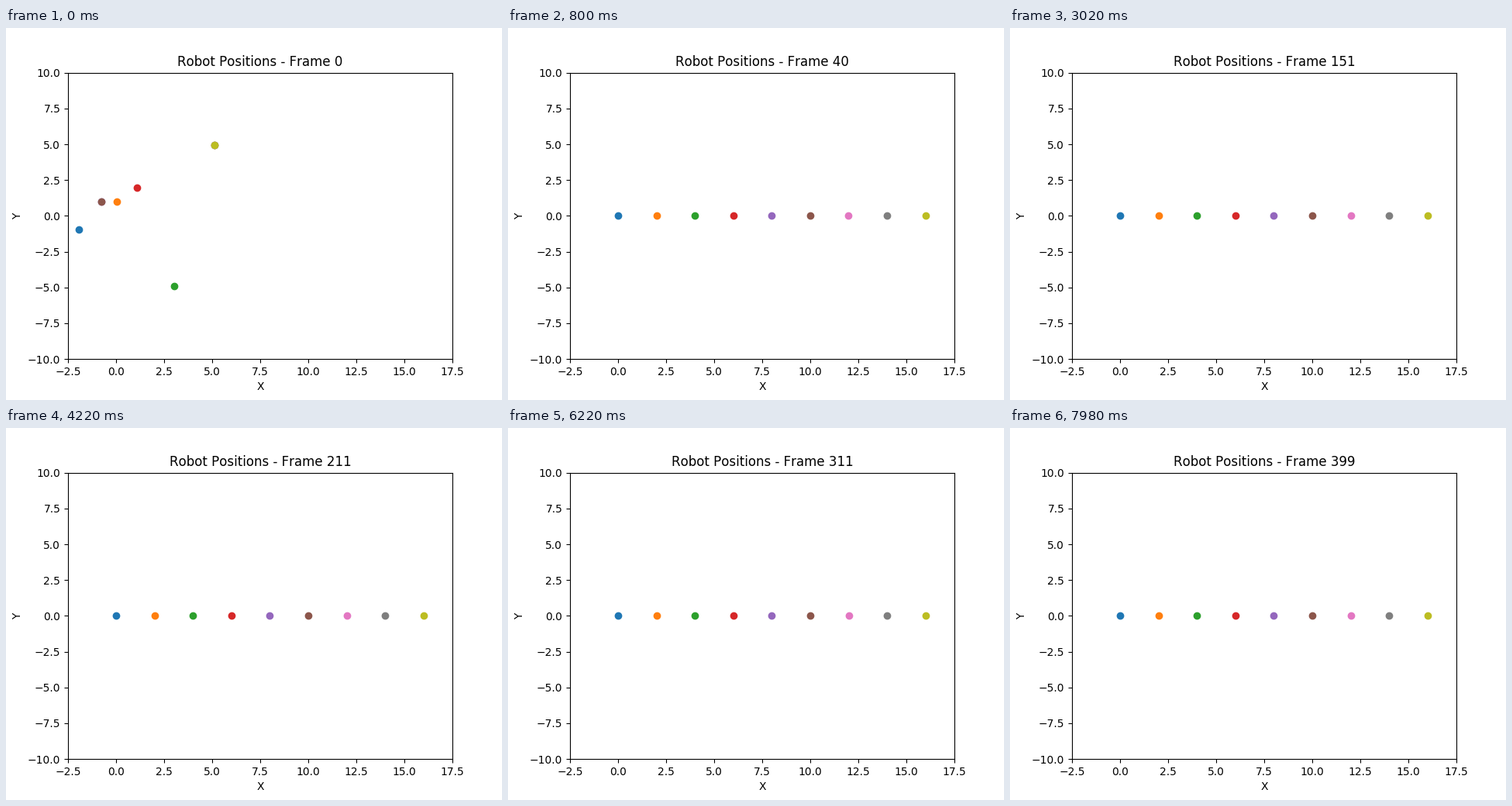
Animation, 640 px wide and 480 px high, one loop 8 s. Source, as a matplotlib script:

```python
import numpy as np
import matplotlib.pyplot as plt
from matplotlib.animation import FuncAnimation

FRAMES = 400
INTERVAL = 20
RATE = 0.23  # critically damped response, per frame

plt.rcParams["text.kerning_factor"] = 6

# Robots line up two units apart; the later ones set off stacked together.
goal = 2.0 * np.arange(9) + 0j
spots = [-1.94 - 0.97j, 0.04 + 0.98j, 3.02 - 4.89j,
         1.09 + 1.96j, -0.77 + 0.98j, 5.13 + 4.92j]
start = np.repeat(spots, [1, 1, 1, 1, 2, 3])


def decay(t):
    return (1 + RATE * t) * np.exp(-RATE * t)


def positions(frame):
    return goal + (start - goal) * decay(frame + 1) / decay(1)


fig, ax = plt.subplots(figsize=(6.4, 4.8), dpi=100)
ax.set(xlim=(-2.5, 17.5), ylim=(-10, 10), xlabel="X", ylabel="Y")
title = ax.set_title("", y=1.0)
robots = [ax.plot([], [], "o")[0] for _ in goal]


def update(frame):
    for robot, p in zip(robots, positions(frame)):
        robot.set_data([p.real], [p.imag])
    title.set_text(f"Robot Positions - Frame {frame}")
    return [*robots, title]


anim = FuncAnimation(fig, update, frames=FRAMES, interval=INTERVAL,
                     init_func=lambda: update(0), repeat=True,
                     repeat_delay=0)
plt.show()
```
